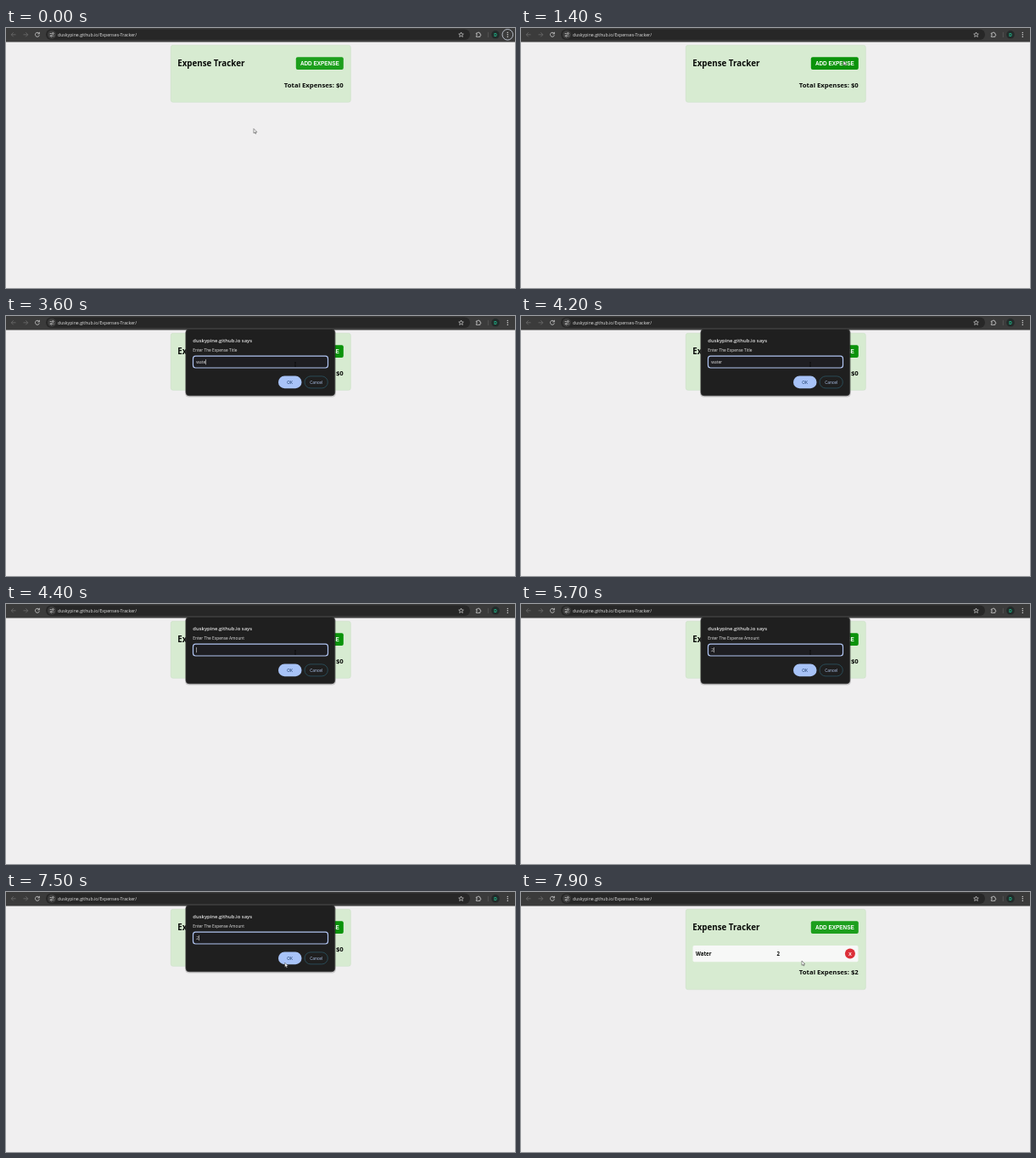
Write an HTML page that moves like this. It is 600 px wide and 306 px high and loops after 8 s.

```html
<!DOCTYPE html>
<html lang="en">
<head>
<meta charset="utf-8">
<title>Expense Tracker</title>
<style>
html, body { margin: 0; height: 100%; overflow: hidden; background: #f0eff0; }
svg { display: block; width: 100vw; height: 100vh; }
text { white-space: pre; }
.page { font-family: "Noto Sans", sans-serif; font-weight: 700; fill: #080a08; }
.label { font-family: "Liberation Sans", Arial, sans-serif; font-weight: 700; fill: #fff; }
.ui { font-family: "Open Sans", sans-serif; font-size: 4.8px; fill: #e3e3e3; }
.line { fill: none; stroke: #d0d0d0; stroke-width: .8; }
.mid { text-anchor: middle; }
.end { text-anchor: end; }
</style>
</head>
<body>
<svg viewBox="0 0 600 306">
  <rect width="600" height="306" fill="#f0eff0"/>

  <!-- browser bar -->
  <rect width="600" height="16.5" fill="#3b3b3b"/>
  <rect x="47" y="1.5" width="500" height="12.5" rx="6.25" fill="#272727"/>
  <g class="line">
    <g stroke="#6c6c6c">
      <path d="M11.5 7.8H6.3M8.7 5.3L6.2 7.8L8.7 10.3"/>
      <path d="M20.5 7.8H25.7M23.3 5.3L25.8 7.8L23.3 10.3"/>
    </g>
    <path d="M38.9 6.2A2.5 2.5 0 1 0 39.4 8.4M39.4 4.8V6.9H37.3"/>
    <circle cx="54" cy="7.8" r="5" fill="#3d3d3d" stroke="none"/>
    <path d="M51.7 6.5H53.6M55.6 9.3H56.6M51.7 9.3H52.6"/>
    <circle cx="55.4" cy="6.5" r=".9"/>
    <circle cx="53.5" cy="9.3" r=".9"/>
    <path d="M536.5 5L537.3 6.9L539.3 7.1L537.8 8.4L538.3 10.4L536.5 9.3L534.7 10.4L535.2 8.4L533.7 7.1L535.7 6.9Z" stroke-width=".7"/>
    <path d="M554.3 6H556A1 1 0 0 1 558 6H558.8V7.2A1 1 0 0 1 558.8 9.2V10.4H554.3V9.2A1 1 0 0 0 554.3 7.2Z"/>
    <path d="M568.3 4.8V11" stroke="#666" stroke-width=".6"/>
  </g>
  <circle cx="577" cy="7.8" r="4.8" fill="#232b2a"/>
  <text class="label mid" x="577" y="9.6" font-size="4.8" style="fill:#1fcf9b">D</text>
  <g fill="#d8d8d8"><circle cx="591.3" cy="5.4" r=".7"/><circle cx="591.3" cy="7.8" r=".7"/><circle cx="591.3" cy="10.2" r=".7"/></g>
  <circle id="ring" cx="591.3" cy="7.8" r="6.3" fill="none" stroke="#d5dcea" stroke-width=".8"/>
  <text class="ui" x="61" y="9.8" style="font-size:5.19px">duskypine.github.io/Expenses-Tracker/</text>

  <!-- page card -->
  <rect id="card" x="194.3" y="20.3" width="212" height="67" rx="2.5" fill="#d7ebd1" stroke="#cbdfc6" stroke-width=".6"/>
  <text class="page" x="202.2" y="45.2" font-size="9.78">Expense Tracker</text>
  <rect id="add" x="341.8" y="34.2" width="56" height="14.8" rx="2"/>
  <text class="label mid" x="369.8" y="43.9" font-size="6.4">ADD EXPENSE</text>
  <g id="row">
    <rect x="202.5" y="63" width="195" height="19.3" rx="2" fill="#f7f8f7"/>
    <text class="page" x="206" y="74.8" font-size="6.1">Water</text>
    <text class="page mid" x="303.3" y="74.8" font-size="6.1">2</text>
    <circle cx="387.9" cy="72.6" r="6" fill="#dc3039"/>
    <text class="label mid" x="387.9" y="74.7" font-size="5.8">X</text>
  </g>
  <text id="total" class="page end" x="397.8" font-size="7.75"></text>

  <!-- prompt -->
  <g id="prompt">
    <rect x="211" y="15.5" width="178" height="80" rx="4.5" fill="#000" opacity=".16"/>
    <rect x="212" y="15.5" width="175.7" height="78.3" rx="4" fill="#1f1f1f" stroke="#3a3a3a" stroke-width=".7"/>
    <text class="ui" x="220.3" y="30.8" style="font-size:5.88px;font-weight:600">duskypine.github.io says</text>
    <text id="ask" class="ui" x="220.3" y="42"></text>
    <rect x="220.5" y="47.2" width="159" height="13.8" rx="3" fill="#1e1e22" stroke="#b1c5f2" stroke-width="1.2"/>
    <text id="typed" class="ui" x="224.3" y="55.9"></text>
    <rect id="caret" y="51" width=".6" height="6.2" fill="#e3e3e3"/>
    <rect x="321" y="70.6" width="27.5" height="14.6" rx="7.3" fill="#a8c3f8"/>
    <text class="ui mid" x="334.7" y="79.7" style="fill:#10305f">OK</text>
    <rect x="352" y="70.9" width="27.3" height="14" rx="7" fill="none" stroke="#2c5664" stroke-width=".8"/>
    <text class="ui mid" x="365.7" y="79.7" style="fill:#b4cbf5">Cancel</text>
  </g>

  <g id="cursor">
    <path id="arrow" d="M0 0V5.3L1.2 4.2L2 6L2.9 5.6L2.1 3.9H3.8Z" fill="#fff" stroke="#333" stroke-width=".5"/>
    <path id="beam" d="M-.8 -2.3H.8M0 -2.3V2.3M-.8 2.3H.8" fill="none" stroke="#050505" stroke-width=".6"/>
  </g>
</svg>
<script>
const $ = id => document.getElementById(id);
const LOOP = 8000, OPEN = 1600, NEXT = 4300, CLOSE = 7700;
// pointer stops: time, x, y
const stops = [
  [0, 292, 118.5], [400, 292, 118.5], [1300, 380, 38.5], [1900, 380, 38.5],
  [2600, 341, 57], [6400, 341, 57], [7000, 316.5, 95], [7200, 316.5, 95],
  [7600, 331, 81], [LOOP, 331, 81]
];
const keys = [2900, 3100, 3300, 3500, 3700];
const amountKey = 5400;

function pointer(t) {
  const i = stops.findIndex(s => s[0] > t);
  const [t0, x0, y0] = stops[i - 1], [t1, x1, y1] = stops[i];
  const u = (t - t0) / (t1 - t0), k = u * u * (3 - 2 * u);
  return [x0 + (x1 - x0) * k, y0 + (y1 - y0) * k];
}

const inside = (x, y, l, t, r, b) => x > l && x < r && y > t && y < b;
const show = (id, on) => $(id).style.display = on ? "" : "none";

function draw(t) {
  const [x, y] = pointer(t);
  const open = t >= OPEN && t < CLOSE, done = t >= CLOSE, amount = t >= NEXT;
  show("ring", t < 1000);
  show("row", done);
  show("prompt", open);

  $("card").setAttribute("height", done ? 94.5 : 67);
  $("total").setAttribute("y", done ? 97.2 : 69.8);
  $("total").textContent = "Total Expenses: $" + (done ? 2 : 0);
  const hover = open || inside(x, y, 342, 34, 398, 49);
  $("add").setAttribute("fill", hover ? "#0a930a" : "#1c9f1c");

  if (open) {
    $("ask").textContent = "Enter The Expense " + (amount ? "Amount" : "Title");
    const count = keys.filter(k => k <= t).length;
    $("typed").textContent = amount ? (t >= amountKey ? "2" : "") : "water".slice(0, count);
    const since = Math.max(...[OPEN, NEXT, amountKey, ...keys].filter(k => k <= t));
    show("caret", (t - since) % 1000 < 500);
    $("caret").setAttribute("x", 224.3 + $("typed").getComputedTextLength());
  }

  const beam = open && inside(x, y, 220, 47, 380, 61);
  show("beam", beam);
  show("arrow", !beam);
  $("cursor").setAttribute("transform", `translate(${x} ${y})`);
}

const start = performance.now();
function tick() {
  const t = (performance.now() - start) % LOOP;
  draw(Math.floor(t / 100) * 100);
  requestAnimationFrame(tick);
}
tick();
</script>
</body>
</html>
```
